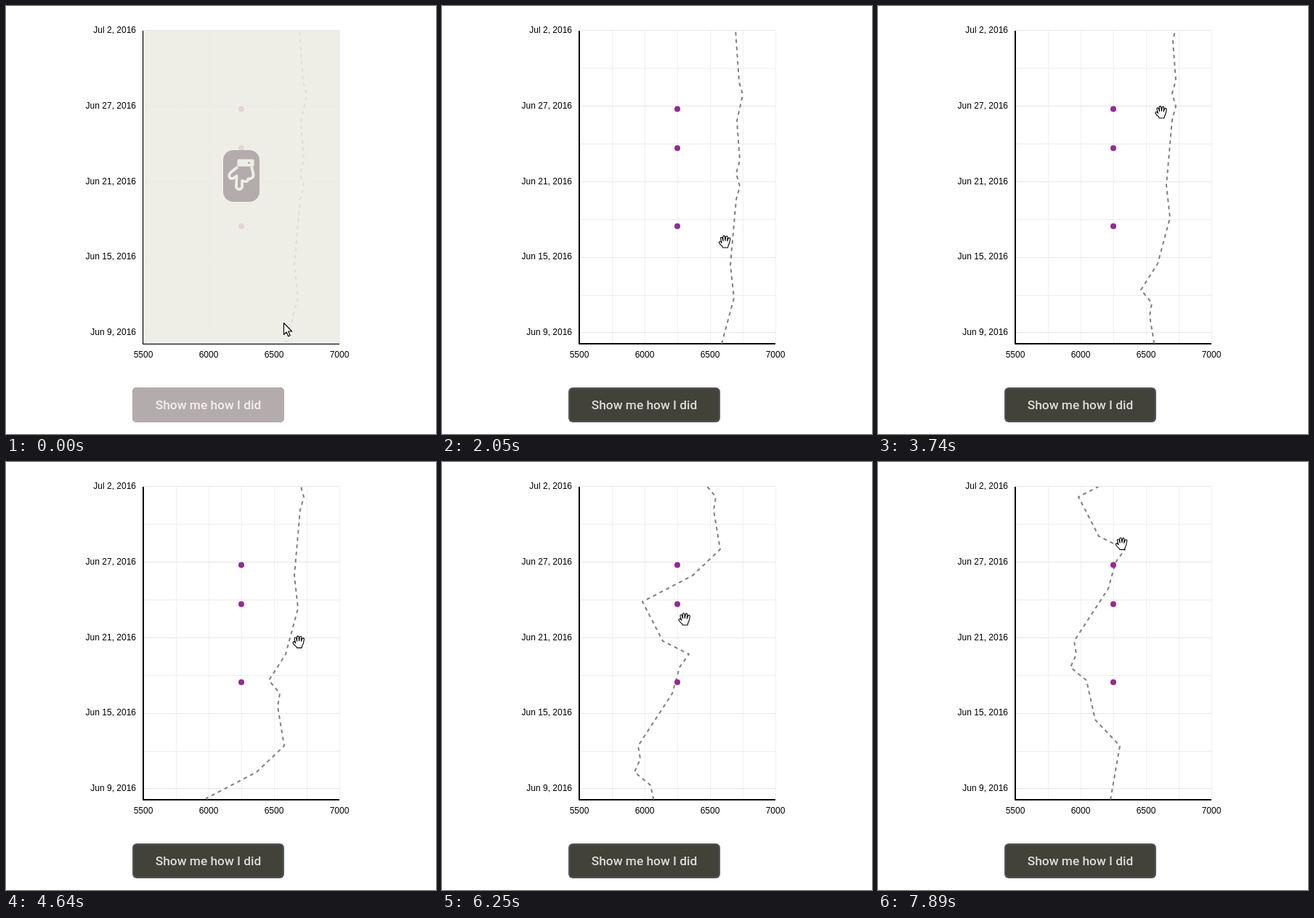
These frames come from a looping animation (592x588 px, 8000 ms). An HTML page with a canvas:

```html
<!DOCTYPE html>
<html lang="en">
<head>
<meta charset="utf-8">
<title>Draggable chart</title>
<style>
html, body { margin: 0; width: 100%; height: 100%; overflow: hidden; background: #fff; }
canvas { display: block; width: 592px; height: 588px; }
</style>
</head>
<body>
<canvas id="stage"></canvas>
<script>
const W = 592, H = 588, LOOP = 8000;
const canvas = document.getElementById('stage');
const ctx = canvas.getContext('2d');
const dpr = window.devicePixelRatio || 1;
canvas.width = W * dpr;
canvas.height = H * dpr;

const plot = { x: 189, y: 34, w: 270, h: 430 };
const ROW = 18;
const TOP = 32;

// Bends of the series: [row, x], straight in between
const bends = [
  [0, 404], [4, 409], [5, 414], [7, 406], [10, 410], [11, 405], [12, 410], [13, 405],
  [18, 397], [20.5, 402], [24, 385], [26, 362], [27, 377], [28, 374], [31, 383],
  [33, 345], [35, 276], [38, 304], [39, 340], [40, 327], [42, 317], [46, 270],
  [47, 273], [48, 265], [49, 287], [52, 299], [54, 333], [60, 314]
];

// Pointer moves and drags: [start, end, x, y, rows scrolled]
const rest = { x: 381, y: 435, rows: -.37 };
const moves = [
  [1800, 2320, 398, 200, rest.rows],
  [2340, 2660, 401, 234, rest.rows],
  [2900, 3340, 390, 108, 6],
  [3690, 3920, 386, 407, 6],
  [4160, 4430, 402, 330, 6],
  [4430, 4970, 404, 85, 21.5],
  [4970, 5420, 388, 113, 20],
  [5420, 5780, 393, 9, 26],
  [5800, 6350, 328, 235, 26],
  [6350, 7300, 333, 133, 33],
  [7510, 7890, 335, 112, 34]
];

const arrow = new Path2D('M.5 .5V16.5L4.2 13L6.8 18.8L9.2 17.7L6.6 12H11.6Z');
const openHand = new Path2D(
  'M.8 10.2C1 8.6 3 8.4 4 10L4.6 10.8L2.9 5C2.6 3 4.8 2.6 5.4 4.4L6.6 8.2L6.2 2.6' +
  'C6.2 .6 8.6 .6 8.8 2.4L9.4 7.8L10.2 2.6C10.6 .8 12.8 1.2 12.6 3L12.2 8.4L13.6 4.8' +
  'C14.4 3 16.6 3.8 16.2 5.6C15.6 8.6 15.6 12 13.6 14.6L13 17.4H6.2L5.6 15.8' +
  'C3.6 14 1.4 12 .8 10.2Z');
const fist = new Path2D(
  'M2 10.5C2 8 4 8.5 4.5 9V7C4.5 5 7 5 7.2 6.4C7.4 4.6 9.8 4.8 10 6.4' +
  'C10.4 4.8 12.8 5 12.8 7C13.4 6 15.6 6.4 15.4 8.4C15.4 11 15 12.5 13.6 14.6' +
  'L13 17.4H6.2L5.6 15.8C3.6 14 2 12.5 2 10.5Z');
const pointDown = new Path2D(
  'M319 221L309 229C305 235 309 239 314 236L317.5 233.5L317 248C317 253 325 253 325 248' +
  'V240C330 242 333.5 241 333.5 237.5C338 238 341 235 340.5 231L338 220');

const clamp = (v) => Math.max(0, Math.min(1, v));
const lerp = (a, b, p) => a + (b - a) * p;
const ease = (p) => p * p * (3 - 2 * p);

function pointerAt(t) {
  let { x, y, rows } = rest;
  for (const [t0, t1, mx, my, mr] of moves) {
    const p = ease(clamp((t - t0) / (t1 - t0)));
    x = lerp(x, mx, p);
    y = lerp(y, my, p);
    rows = lerp(rows, mr, p);
  }
  return { x, y, rows };
}

// Scrolling settles on whole rows, with a short slide between them.
function scrollFor(rows) {
  const n = Math.floor(rows);
  return ROW * (n + clamp((rows - n - .5) * 3 + .5)) + 2;
}

function seriesX(row) {
  const i = Math.max(1, bends.findIndex((b) => b[0] >= row));
  const [r0, x0] = bends[i - 1], [r1, x1] = bends[i];
  return lerp(x0, x1, (row - r0) / (r1 - r0));
}

function rect(color, x, y, w, h) {
  ctx.fillStyle = color;
  ctx.fillRect(x, y, w, h);
}

function pill(color, x, y, w, h, r) {
  ctx.fillStyle = color;
  ctx.beginPath();
  ctx.roundRect(x, y, w, h, r);
  ctx.fill();
}

function text(str, x, y, align, font, color) {
  ctx.font = font;
  ctx.textAlign = align;
  ctx.fillStyle = color;
  ctx.fillText(str, x, y);
}

function drawGrid() {
  for (let i = 1; i <= 6; i++) rect('#efefef', plot.x + 45 * i, plot.y, 1, plot.h);
  for (let i = 0; i < 9; i++) {
    rect(i % 2 ? '#ececea' : '#e7e7e1', plot.x, Math.floor(33.95 + 51.87 * i), plot.w, 1);
  }
}

function drawAxes() {
  rect('#000', 188, 34, 2, 431);
  rect('#000', 188, 463, 271, 2);
  const font = '12px "Liberation Sans", Arial, sans-serif';
  ['Jul 2', 'Jun 27', 'Jun 21', 'Jun 15', 'Jun 9'].forEach((d, i) =>
    text(d + ', 2016', 179, Math.round(37 + 103.8 * i), 'right', font, '#000'));
  for (let i = 0; i < 4; i++) text(5500 + 500 * i, 189 + 90 * i, 483, 'center', font, '#000');
}

// Drawn from the lower edge up, so the dashes start there.
function drawSeries(scroll) {
  const bottom = plot.y + plot.h;
  const first = (bottom + scroll - TOP) / ROW;
  ctx.save();
  ctx.beginPath();
  ctx.rect(plot.x, plot.y, plot.w, plot.h);
  ctx.clip();
  ctx.beginPath();
  ctx.moveTo(seriesX(first), bottom);
  for (let i = bends.length - 1; i >= 0; i--) {
    const [row, x] = bends[i];
    if (row < first) ctx.lineTo(x, TOP + ROW * row - scroll);
  }
  ctx.strokeStyle = '#7f7f7f';
  ctx.lineWidth = 2;
  ctx.setLineDash([5, 5]);
  ctx.stroke();
  ctx.restore();
}

function drawDots() {
  ctx.fillStyle = '#922b92';
  for (const k of [0, 1, 3]) {
    ctx.beginPath();
    ctx.arc(324, 141.5 + 53.7 * k, 4, 0, 7);
    ctx.fill();
  }
}

function drawButton(alpha) {
  const label = (color) => text('Show me how I did', 278.5, 554, 'center',
    '500 17.3px Roboto, sans-serif', color);
  pill('#54575a', 174, 524, 209, 48, 6);
  pill('#434239', 176, 526, 205, 44, 4);
  label('#dddcd9');
  ctx.globalAlpha = alpha;
  pill('#b4acac', 174, 524, 209, 48, 6);
  label('#f2f0ec');
  ctx.globalAlpha = 1;
}

function drawOverlay(alpha) {
  ctx.globalAlpha = .88 * alpha;
  rect('#edece3', plot.x, plot.y, plot.w, plot.h);
  ctx.globalAlpha = alpha;
  pill('#b4acac', 299, 198, 50, 71, 14);
  ctx.strokeStyle = '#efeee6';
  ctx.lineWidth = 3.8;
  ctx.lineJoin = 'round';
  ctx.stroke(pointDown);
  pill('#efeee6', 318.5, 210.5, 23, 10, 2);
  pill('#b4acac', 333, 214, 3, 3, 1.5);
  ctx.globalAlpha = 1;
}

function drawCursor(t, { x, y }) {
  const idle = t < 190;
  const shape = idle ? arrow : t >= 520 && t < 1510 ? fist : openHand;
  ctx.save();
  if (idle) ctx.translate(382, 435);
  else ctx.translate(x - 8.5, y - 9);
  ctx.fillStyle = '#fff';
  ctx.strokeStyle = '#000';
  ctx.lineWidth = 1.1;
  ctx.lineJoin = 'round';
  ctx.fill(shape);
  ctx.stroke(shape);
  ctx.restore();
}

function draw(t) {
  ctx.setTransform(dpr, 0, 0, dpr, 0, 0);
  rect('#fff', 0, 0, W, H);
  const cover = 1 - clamp((t - 650) / 460);
  const pointer = pointerAt(t);
  drawGrid();
  drawAxes();
  drawSeries(scrollFor(pointer.rows));
  drawDots();
  if (cover > 0) drawOverlay(cover);
  drawButton(cover);
  drawCursor(t, pointer);
}

const start = performance.now();
function tick() {
  draw((performance.now() - start) % LOOP);
  requestAnimationFrame(tick);
}
tick();
</script>
</body>
</html>
```
